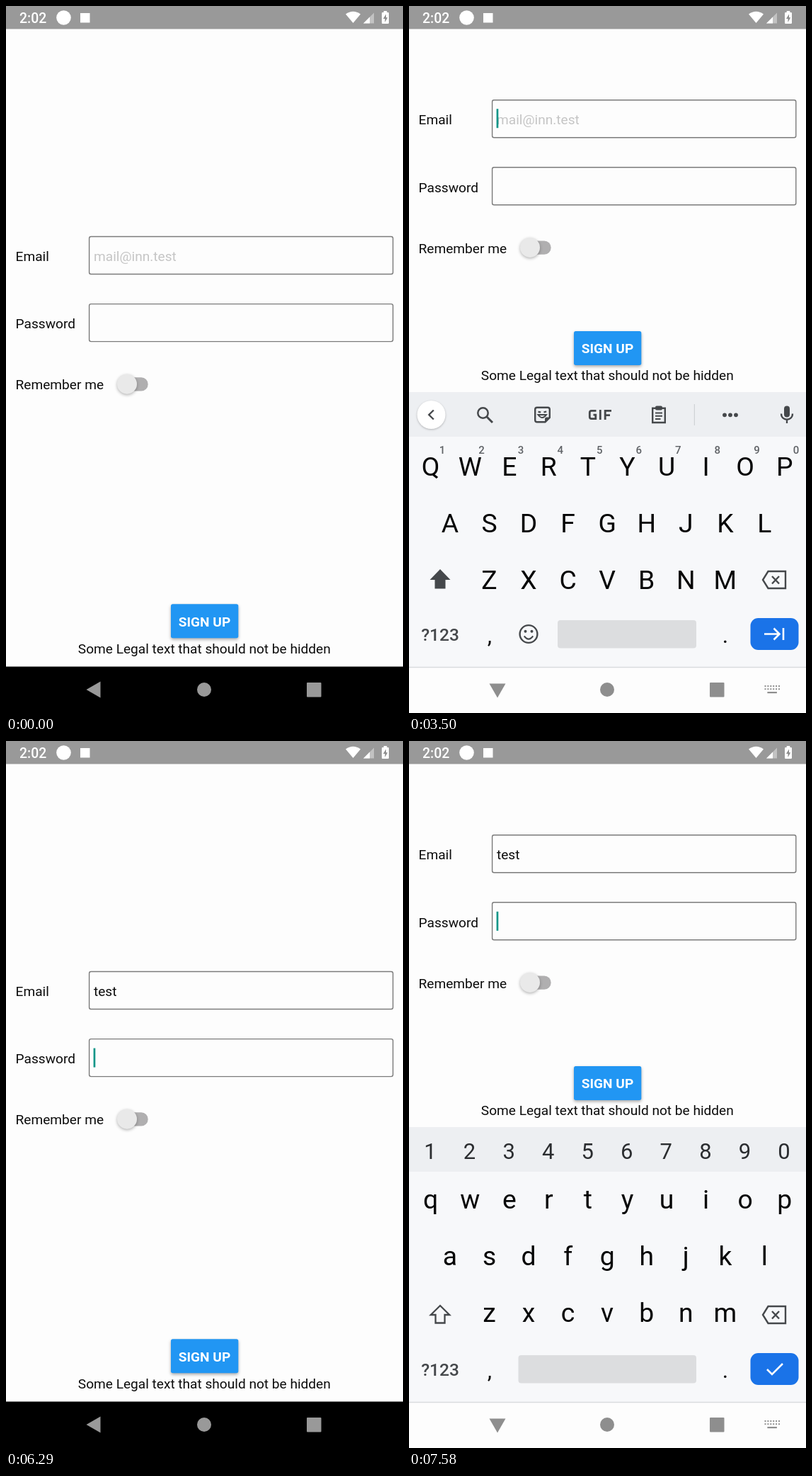
Recreate the animation shown at these times as an HTML page with a canvas. Size 561x998 px, loop 8000 ms.

```html
<!DOCTYPE html>
<html lang="en">
<head>
<meta charset="utf-8">
<title>Sign up form with keyboard</title>
<style>
html, body { margin: 0; width: 100%; height: 100%; overflow: hidden; background: #fdfdfd; }
canvas { display: block; }
</style>
</head>
<body>
<canvas id="stage" width="561" height="998"></canvas>
<script>
const W = 561, H = 998, LOOP = 8000;
const NAV_Y = 932.5, KB_Y = 545, PITCH = 55.55;
const INK = '#45484b';
const stage = document.getElementById('stage').getContext('2d');
const layer = document.createElement('canvas');
layer.width = W;
layer.height = H;
const kb = layer.getContext('2d');
let g = stage;

// Timeline in ms
const OPEN = [2310, 2520], CLOSE = [5950, 6110], REOPEN = [6522, 6740];
const TYPED = [[3580, 't'], [3720, 'te'], [3770, 'tes'], [3940, 'test']];
const WORDS = [
  [3680, ['the', 'to', 'that']],
  [3940, ['test', 'rest', 'tests']],
  [4430, ['test', 'rest', 'testing']]
];

const within = (t, [a, b]) => t >= a && t < b;
const clamp = v => Math.max(0, Math.min(1, v));
const span = (t, [a, b]) => clamp((t - a) / (b - a));
const latest = (list, t, none) => list.reduce((v, [at, item]) => t >= at ? item : v, none);

function text(s, x, y, size, color, align = 'left', weight = 400) {
  g.font = `${weight} ${size}px Roboto, sans-serif`;
  g.textAlign = align;
  g.fillStyle = color;
  g.fillText(s, x, y);
}

function box(x, y, w, h, color, r = 0) {
  g.beginPath();
  g.roundRect(x, y, w, h, r);
  g.fillStyle = color;
  g.fill();
}

function disc(x, y, r, color) {
  g.beginPath();
  g.arc(x, y, r, 0, 7);
  g.fillStyle = color;
  g.fill();
}

function poly(points, color) {
  g.fillStyle = color;
  g.fill(new Path2D('M' + points + 'Z'));
}

function line(d, color = INK, width = 2.4) {
  g.strokeStyle = color;
  g.lineWidth = width;
  g.stroke(new Path2D(d));
}

function at(x, y, draw) {
  g.save();
  g.translate(x, y);
  draw();
  g.restore();
}

function shadow(blur, dy, alpha, draw) {
  g.save();
  g.shadowColor = `rgba(0,0,0,${alpha})`;
  g.shadowBlur = blur;
  g.shadowOffsetY = dy;
  draw();
  g.restore();
}

function statusBar() {
  box(0, 0, W, 32.5, '#999');
  text('2:02', 19, 23.5, 19.4, '#fff', 'left', 500);
  disc(81.5, 16.5, 10.3, '#fff');
  box(105, 10, 13.5, 13.5, '#fff');
  g.fillStyle = '#fff';
  g.fill(new Path2D('M490.5 24L480 11.5Q490.5 4 501 11.5Z'));
  poly('505 24.5L520 9.5V24.5', 'rgba(255,255,255,.4)');
  poly('505 24.5L514 15.5V24.5', '#fff');
  box(533.7, 7, 4.6, 3, '#fff');
  box(531, 9, 10, 16, '#fff', 1.2);
  poly('537 11.5L533 18H535.5V23L539.2 16.2H537', '#8c8c8c');
}

function field(y) {
  g.beginPath();
  g.roundRect(117.6, y, 429.2, 53, 2.5);
  g.strokeStyle = '#7b7b7b';
  g.lineWidth = 1.4;
  g.stroke();
}

function caret(x, y) {
  box(x, y, 2.7, 27, '#0b9588');
}

function form(t) {
  const typed = latest(TYPED, t, '');
  const emailEnd = 124 + (typed ? (text(typed, 124, 360, 19.1, '#0c0c0c'), g.measureText(typed).width) : 0);
  if (!typed) text('mail@inn.test', 124, 360, 19.1, '#c5c5c5');
  if (typed && t < CLOSE[0]) box(124, 362.3, emailEnd - 124, 1.4, '#222');

  text('Email', 13.6, 360, 19.1, '#0c0c0c');
  text('Password', 13.6, 455.3, 19.1, '#0c0c0c');
  text('Remember me', 13.6, 541.3, 19.1, '#0c0c0c');
  field(325.5);
  field(420.6);

  const emailCaret = within(t, [2000, 2520]) || within(t, [3500, 4950]) || within(t, [5470, 5910]);
  const passCaret = within(t, [6190, 6690]) || t >= 7580;
  if (emailCaret) caret(typed ? emailEnd - .2 : 123.6, 338);
  if (passCaret) caret(123.6, 433.6);

  box(162, 524.3, 38.7, 19.2, '#b0afb0', 9.6);
  shadow(4, 1.5, .3, () => disc(171, 533.7, 14, '#e9e9e9'));
}

function footer() {
  shadow(4, 2, .35, () => box(233, 844.3, 95.3, 48, '#2196f3', 2.7));
  text('SIGN UP', 280.5, 875.6, 19.1, '#fff', 'center', 700);
  text('Some Legal text that should not be hidden', 280.3, 913.6, 19.1, '#0c0c0c', 'center');
}

function chevron(turn) {
  shadow(3, 1, .25, () => disc(31.5, 577, 20, '#fff'));
  at(31.5, 577, () => {
    g.rotate(Math.PI * turn);
    line('M3.3 -6.5L-3.3 0L3.3 6.5');
  });
}

function mic() {
  at(534, 577, () => {
    box(-4, -12.5, 8, 16, INK, 4);
    line('M-8 -1.5C-8 9.5 8 9.5 8 -1.5M0 7V12', INK, 2.3);
  });
}

function toolbar() {
  at(107, 577, () => {
    g.beginPath();
    g.arc(-2.5, -2.5, 7.2, 0, 7);
    g.strokeStyle = INK;
    g.lineWidth = 2.5;
    g.stroke();
    line('M2.8 2.8L11 11', INK, 3);
  });
  at(188.5, 577, () => {
    line('M-7.5 -10.3H7.5Q10.3 -10.3 10.3 -7.5V4L4 10.3H-7.5Q-10.3 10.3 -10.3 7.5V-7.5Q-10.3 -10.3 -7.5 -10.3Z');
    poly('3.5 10V6Q3.5 3.5 6 3.5H10', INK);
    line('M-6 0Q0 8 5.5 0Z', INK, 2);
    line('M-6 -4.2L-2.3 -3.6M2 -3.6L5.7 -4.5', INK, 2.2);
  });
  at(270, 577, () => {
    line('M-5.5 -5.6H-12Q-14.7 -5.6 -14.7 -3V3Q-14.7 5.6 -12 5.6H-6.2V.2H-9.5M.3 -7V7M7.2 7V-5.6H16M7.2 .7H14', INK, 2.8);
  });
  at(353, 577, () => {
    line('M-8.8 -9.3H8.8V11H-8.8Z');
    box(-5, -12.5, 10, 6, INK, 2);
    line('M-5 -2.6H5M-5 1.7H5M-5 6H2.5', INK, 2);
  });
  box(402.8, 562, 1.2, 30, '#cfd2d5');
  for (const x of [446, 454, 462]) disc(x, 577.3, 2.9, INK);
}

function suggestions(words) {
  [124, 279, 433.5].forEach((x, i) => text(words[i], x, 587, 24, '#505356', 'center'));
  box(196.5, 562, 1.2, 31, '#c9ccd0');
  box(360.5, 562, 1.2, 31, '#c9ccd0');
}

function letters(row, x, y, upper) {
  [...row].forEach((ch, i) =>
    text(upper ? ch.toUpperCase() : ch, x + i * PITCH, y + (upper ? 3 : 0), 37.3, '#050505', 'center'));
}

function shiftKey(upper) {
  const arrow = '44 797L57.2 810H50.5V821.5H37.5V810H30.8';
  if (upper) poly('44 795L58.5 810H51.5V822.5H36.5V810H29.5', INK);
  else line('M' + arrow + 'Z', INK, 2.3);
}

function bottomRow(secret) {
  text('?123', 44, 896, 24.5, INK, 'center', 500);
  text(',', 114, 898.5, 32, '#111', 'center');
  text('.', 447, 898.5, 32, '#111', 'center');
  const left = secret ? 154.5 : 210;
  box(left, 867, 406 - left, 39.5, '#dcdddf', 4);
  if (!secret) at(169, 886.5, () => {
    g.beginPath();
    g.arc(0, 0, 12.4, 0, 7);
    g.strokeStyle = INK;
    g.lineWidth = 2.4;
    g.stroke();
    disc(-4.5, -3.8, 2, INK);
    disc(4.5, -3.8, 2, INK);
    line('M-6.2 2.8Q0 11.3 6.2 2.8', INK, 2.2);
  });
  box(482.5, 864, 68, 45, '#1a73e8', 11);
  if (secret) line('M506 887L513 894L528 879', '#fff', 2.6);
  else line('M502 886.5H523M515.5 878.5L523.5 886.5L515.5 894.5M529 878V895', '#fff', 2.6);
}

function keyboard(t) {
  const secret = t > CLOSE[1];
  const upper = t < 3580;
  g = kb;
  g.clearRect(0, 0, W, H);
  box(0, KB_Y, W, H, '#f7f8fa');
  box(0, KB_Y, W, 63, '#edeff2');
  if (secret) {
    for (let i = 0; i < 10; i++) text((i + 1) % 10, 30 + i * PITCH, 589.5, 31, '#2b2d30', 'center');
  } else {
    const words = latest(WORDS, t, null);
    if (words) suggestions(words);
    else toolbar();
    chevron(span(t, [3680, 3990]));
    mic();
    for (let i = 0; i < 10; i++) text((i + 1) % 10, 47 + i * PITCH, 632, 15, '#5f6266', 'center', 500);
  }
  letters('qwertyuiop', 30.7, 660, upper);
  letters('asdfghjkl', 58, 740, upper);
  letters('zxcvbnm', 113.5, 820, upper);
  shiftKey(upper);
  line('M507.5 798H532V822H507.5L500 810ZM513 805L523 815.5M523 805L513 815.5', INK, 2.4);
  bottomRow(secret);
  box(0, 933, W, H, '#fdfdfd');
  box(0, 932.7, W, 1.6, '#d9dbde');
  g = stage;
}

function navButtons(open) {
  const color = open ? 'rgba(0,0,0,.44)' : '#999';
  if (open) poly('113.5 956.5H136.5L125 976.5', color);
  else poly('113.5 965L133.5 953.5V976.5', color);
  disc(280, 965, 10, color);
  box(425, 955, 20.5, 20.5, color, 1);
  if (!open) return;
  for (let i = 0; i < 6; i++) {
    box(502.5 + i * 3.9, 959, 2, 2, color);
    box(502.5 + i * 3.9, 963.2, 2, 2, color);
  }
  box(506.4, 968, 13.5, 2.2, color);
}

// Keyboard slide: enters from below while fading, leaves the same way.
function pose(t) {
  if (t < OPEN[0] || within(t, [CLOSE[1], REOPEN[0]])) return null;
  if (within(t, CLOSE)) {
    const u = span(t, CLOSE);
    return { dy: 45 * u * u, alpha: 1 - u };
  }
  const u = span(t, t < CLOSE[0] ? OPEN : REOPEN);
  return { dy: 55 * (1 - u) ** 2, alpha: .58 + .42 * u };
}

function draw(t) {
  const open = within(t, [OPEN[0], CLOSE[0]]) || t >= REOPEN[0];
  const slide = pose(t);
  box(0, 0, W, H, '#fdfdfd');
  at(0, open ? -192.8 : 0, () => form(t));
  at(0, open ? -385.3 : 0, footer);
  box(0, NAV_Y, W, H - NAV_Y, '#000');
  if (slide) {
    keyboard(t);
    stage.globalAlpha = slide.alpha;
    stage.drawImage(layer, 0, slide.dy);
    if (slide.dy) stage.drawImage(layer, 0, H - 1, W, 1, 0, H - 1, W, 1);
    stage.globalAlpha = 1;
  }
  navButtons(open);
  statusBar();
}

function tick() {
  draw(performance.now() % LOOP);
  requestAnimationFrame(tick);
}
tick();
</script>
</body>
</html>
```
